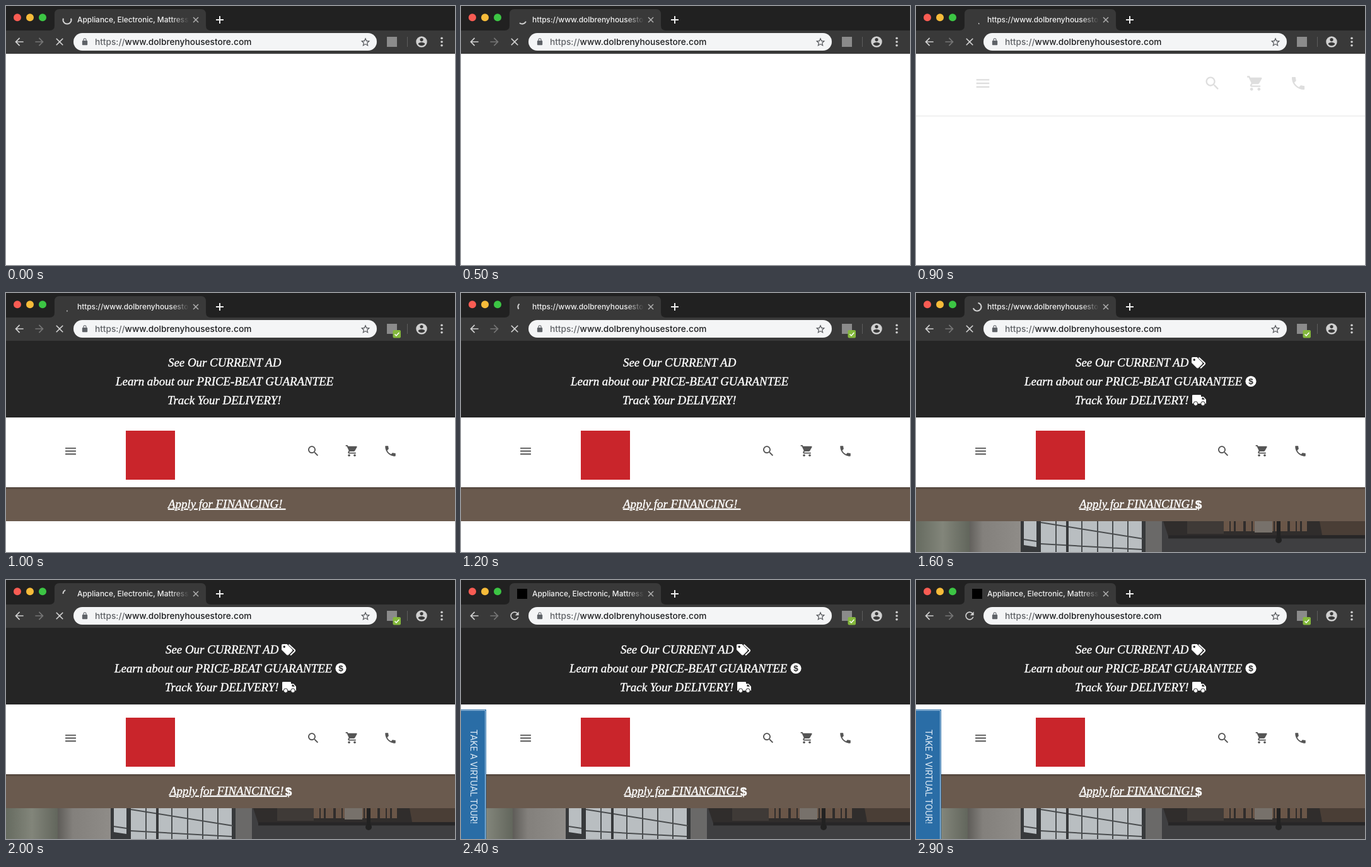
Write an HTML page that moves like this. It is 712 by 412 pixels and loops after 3 s.

```html
<!DOCTYPE html>
<html lang="en">
<head>
<meta charset="utf-8">
<title>Page load</title>
<style>
html, body { margin: 0; width: 100%; height: 100%; overflow: hidden; background: #fff; }
svg { display: block; }
text { white-space: pre; }
.ui { font-family: Inter, sans-serif; font-weight: 500; }
.serif { font: italic 18.9px "Liberation Serif", serif; fill: #fff; stroke: #fff; stroke-width: .4; }
.bold { font-family: "Liberation Sans", sans-serif; font-weight: bold; }
</style>
</head>
<body>
<svg width="712" height="412" viewBox="0 0 712 412">
  <defs>
    <clipPath id="tabClip"><rect x="113" y="10" width="177" height="24"/></clipPath>
    <linearGradient id="fade"><stop stop-color="#393939" stop-opacity="0"/><stop offset="1" stop-color="#393939"/></linearGradient>
    <linearGradient id="plaster"><stop stop-color="#666b60"/><stop offset=".5" stop-color="#82857a"/><stop offset="1" stop-color="#62665c"/></linearGradient>
    <linearGradient id="wall" gradientUnits="userSpaceOnUse" x1="80" x2="166"><stop stop-color="#5b5955"/><stop offset=".3" stop-color="#83807c"/><stop offset="1" stop-color="#8f8c88"/></linearGradient>
    <linearGradient id="shade" x2="0" y2="1"><stop stop-opacity=".3"/><stop offset="1" stop-opacity="0"/></linearGradient>
    <path id="menu" d="M3 18h18v-2H3zM3 13h18v-2H3zM3 6v2h18V6z"/>
    <path id="search" d="M15.5 14h-.79l-.28-.27C15.41 12.59 16 11.11 16 9.5 16 5.91 13.09 3 9.5 3S3 5.91 3 9.5 5.91 16 9.5 16c1.61 0 3.09-.59 4.23-1.57l.27.28v.79l5 4.99L20.49 19zm-6 0C7.01 14 5 11.99 5 9.5S7.01 5 9.5 5 14 7.01 14 9.5 11.99 14 9.5 14z"/>
    <g id="cart"><circle cx="7" cy="20" r="2"/><circle cx="17" cy="20" r="2"/>
      <path d="M1 2v2h2l3.6 7.6-1.35 2.4C4.5 15.4 5.5 17 7 17h12v-2H7.4q-.3-.1-.2-.4L8.1 13h7.45c.75 0 1.4-.4 1.75-1l3.6-6.5Q21.5 4 20 4H5.2l-.9-2z"/></g>
    <path id="phone" d="M6.62 10.79c1.44 2.83 3.76 5.14 6.59 6.59l2.2-2.2c.27-.27.67-.36 1.02-.24 1.12.37 2.33.57 3.57.57.55 0 1 .45 1 1V20c0 .55-.45 1-1 1C10.61 21 3 13.39 3 4c0-.55.45-1 1-1h3.5c.55 0 1 .45 1 1 0 1.25.2 2.45.57 3.57.11.35.03.74-.25 1.02z"/>
    <path id="arrow" d="M20 11H7.83l5.59-5.59L12 4l-8 8 8 8 1.41-1.41L7.83 13H20z"/>
    <path id="close" d="M19 6.41L17.59 5 12 10.59 6.41 5 5 6.41 10.59 12 5 17.59 6.41 19 12 13.41 17.59 19 19 17.59 13.41 12z"/>
    <path id="reload" d="M17.65 6.35C16.2 4.9 14.21 4 12 4c-4.42 0-8 3.58-8 8s3.58 8 8 8c3.73 0 6.84-2.55 7.73-6h-2.08c-.82 2.33-3.04 4-5.65 4-3.31 0-6-2.69-6-6s2.69-6 6-6c1.66 0 3.14.69 4.22 1.78L13 11h7V4z"/>
    <path id="lock" fill-rule="evenodd" d="M18 8h-1V6A5 5 0 0 0 7 6v2H6q-2 0-2 2v10q0 2 2 2h12q2 0 2-2V10q0-2-2-2zM9 6a3 3 0 0 1 6 0v2H9z"/>
    <path id="star" d="M22 9.24l-7.19-.62L12 2 9.19 8.63 2 9.24l5.46 4.73L5.82 21 12 17.27 18.18 21l-1.63-7.03zM12 15.4l-3.76 2.27 1-4.28-3.32-2.88 4.38-.38L12 6.1l1.71 4.04 4.38.38-3.32 2.88 1 4.28z"/>
    <path id="person" fill-rule="evenodd" d="M12 2a10 10 0 1 0 0 20 10 10 0 0 0 0-20zm0 3a3 3 0 1 1 0 6 3 3 0 0 1 0-6zm0 14.2c-2.5 0-4.71-1.28-6-3.22.03-1.99 4-3.08 6-3.08s5.97 1.09 6 3.08c-1.29 1.94-3.5 3.22-6 3.22z"/>
  </defs>

  <!-- Bare page header -->
  <g data-show="800-1000" fill="#dedede">
    <path d="M0 175h712" stroke="#ececec" stroke-width="1.5"/>
    <g id="bareIcons"></g>
  </g>

  <!-- Hero photo -->
  <g data-show="1300-3000">
    <rect y="363" width="712" height="49" fill="#3f3f41"/>
    <rect y="363" width="170" height="49" fill="url(#wall)"/>
    <rect id="panel" y="363" height="49" fill="url(#plaster)"/>
    <path d="M166 363h198v49H166z" fill="#37393b"/>
    <path d="M171 363h20v41l-20-3zM198 363h160v49H198z" fill="#b9bec1"/>
    <path d="M222 363v49M263 363v49M288 363v49M312 363v49M336 363v49M198 365L360 391M171 392l20 3M198 399l160 9" stroke="#4a4d4f" stroke-width="2" fill="none"/>
    <path d="M240 363v49" stroke="#37393b" stroke-width="4"/>
    <path d="M364 363h26v49h-26z" fill="#6a6968"/>
    <path d="M392 363h320v24H400z" fill="#302d2c"/>
    <path d="M430 363h58v20h-58z" fill="#3f3a37"/>
    <path d="M488 371h132" stroke="#6a5648" stroke-width="16" stroke-dasharray="9 2 5 3 12 4"/>
    <path d="M537 363h28v18h-28z" fill="#77716b"/>
    <path d="M640 363h72v22h-68z" fill="#4a3e36"/>
    <path d="M400 388h312" stroke="#272627" stroke-width="5"/>
    <path d="M575 363v30" stroke="#222" stroke-width="6"/>
    <circle cx="575" cy="393" r="5" fill="#222"/>
  </g>

  <!-- Loaded page header -->
  <g data-show="1000-3000">
    <rect y="76" width="712" height="122" fill="#252525"/>
    <rect y="198" width="712" height="111" fill="#fff"/>
    <rect y="309" width="712" height="54" fill="#6a5a4e"/>
    <rect y="309" width="712" height="4" fill="url(#shade)"/>
    <rect x="190" y="219" width="78" height="78" fill="#c9252b"/>
    <g id="icons" fill="#555"></g>
    <g id="lines" class="serif"></g>
  </g>
  <g data-show="1300-3000" fill="#fff">
    <g transform="translate(437 102)">
      <path fill-rule="evenodd" d="M0 2Q0 0 2 0H8.5L17 8.5Q18 9.8 17 11L11 17Q9.5 18.2 8 17L0 9zM4.2 2.5a1.7 1.7 0 1 0 .01 0z"/>
      <path d="M11.5 .8L20.7 9.2Q21.6 10.2 20.7 11.2L14 17.6" fill="none" stroke="#fff" stroke-width="2"/>
    </g>
    <circle cx="531" cy="140.5" r="8.6"/>
    <text class="bold" x="531" y="145.3" font-size="13.5" text-anchor="middle" fill="#252525">$</text>
    <g transform="translate(438 162)">
      <rect width="14" height="14" rx="1.3"/>
      <path d="M13.5 3H18L22 7.5V14H13.5z"/>
      <path d="M15.5 4.6h2L20 7.5h-4.5z" fill="#252525"/>
      <g stroke="#252525"><circle cx="5.5" cy="14" r="3.3"/><circle cx="17" cy="14" r="3.3"/></g>
    </g>
    <text class="bold" x="448" y="342.5" font-size="19" text-anchor="middle" stroke="#fff" stroke-width=".5">$</text>
  </g>

  <!-- Side button -->
  <g data-show="2300-3000">
    <rect y="206" width="40" height="206" fill="#2a6da6"/>
    <path d="M0 207.5H38.5V412" fill="none" stroke="#a9c8e2"/>
    <text transform="translate(14.5 238) rotate(90)" font-family="Roboto, sans-serif" font-size="14.3" fill="#dce9f4">TAKE A VIRTUAL TOUR!</text>
  </g>

  <!-- Browser frame -->
  <rect width="712" height="39" fill="#212121"/>
  <path d="M69 39q8 0 8-8V13q0-8 8-8H309q8 0 8 8V31q0 8 8 8H712V76H0V39z" fill="#393939"/>
  <circle cx="18" cy="18.3" r="6" fill="#f95c53"/>
  <circle cx="38" cy="18.3" r="6" fill="#f6bb3a"/>
  <circle cx="58" cy="18.3" r="6" fill="#3cc544"/>
  <path id="spinner" fill="none" stroke="#d2d2d2" stroke-width="2"/>
  <rect data-show="2300-3000" x="89" y="14" width="16" height="16" fill="#000"/>
  <g clip-path="url(#tabClip)">
    <text id="tabTitle" class="ui" x="113" y="26.3" font-size="11.9" fill="#f1f1f1"></text>
    <rect x="262" y="12" width="28" height="20" fill="url(#fade)"/>
  </g>
  <path d="M297 18l8 8M305 18l-8 8" stroke="#b0b0b0" stroke-width="1.5"/>
  <path d="M333 22h12M339 16v12" stroke="#eee" stroke-width="2"/>
  <rect x="107" y="43" width="481" height="28" rx="14" fill="#f4f5f6"/>
  <text class="ui" x="141" y="62" font-size="13.7" fill="#5f6266">https://<tspan id="address" fill="#1c1d1f"></tspan></text>
  <rect x="604" y="49" width="16" height="16" fill="#8b8b8b"/>
  <g data-show="1000-3000">
    <rect x="613.5" y="59" width="12.5" height="12.5" rx="2" fill="#84b83c"/>
    <path d="M616.5 65.5l2.4 2.5 4.4-5" fill="none" stroke="#fff" stroke-width="1.5"/>
  </g>
  <path d="M636.5 49v16" stroke="#5c5c5c"/>
  <g id="bar" fill="#d0d0d0"><circle cx="691" cy="51.3" r="1.8"/><circle cx="691" cy="57" r="1.8"/><circle cx="691" cy="62.7" r="1.8"/></g>
</svg>
<script>
const $ = id => document.getElementById(id);
const LOOP = 3000, STEP = 100;
const site = "www.dolbrenyhousestore.com";

function add(parent, tag, attrs) {
  const el = document.createElementNS("http://www.w3.org/2000/svg", tag);
  for (const key in attrs) el.setAttribute(key, attrs[key]);
  return $(parent).appendChild(el);
}

// Place a 24-unit icon with its middle at x, y.
function icon(parent, name, x, y, size, { flip, ...attrs } = {}) {
  const k = size / 24;
  add(parent, "use", {
    href: "#" + name, ...attrs,
    transform: `translate(${x} ${y}) scale(${flip ? -k : k} ${k}) translate(-12 -12)`
  });
}

icon("bareIcons", "menu", 106, 123, 27.5);
icon("bareIcons", "search", 470, 123, 28);
icon("bareIcons", "cart", 538, 123, 28);
icon("bareIcons", "phone", 606, 123, 27);
icon("icons", "menu", 102.5, 251.5, 22.5);
icon("icons", "search", 487.3, 251.5, 22);
icon("icons", "cart", 548.5, 251, 21.5);
icon("icons", "phone", 609.5, 251.5, 22);

icon("bar", "arrow", 21, 57, 20);
icon("bar", "arrow", 53, 57, 20, { flip: true, fill: "#757575" });
icon("bar", "close", 85, 57, 20, { "data-show": "0-2300" });
icon("bar", "reload", 85, 57, 20, { "data-show": "2300-3000" });
icon("bar", "lock", 125, 57, 12.5, { fill: "#5f6368" });
icon("bar", "star", 570, 57.5, 17.5, { fill: "#505357" });
icon("bar", "person", 659, 57, 21);
$("address").textContent = site;

// Text, baseline, x before and after the trailing icons load.
const lines = [
  ["See Our CURRENT AD", 117, 257, 253],
  ["Learn about our PRICE-BEAT GUARANTEE", 147, 174, 172],
  ["Track Your DELIVERY!", 177, 256, 252],
  ["Apply for FINANCING! ", 342, 257, 259]
].map(([text, y, early, late], i) => {
  const el = add("lines", "text", i == 3 ? { y, "text-decoration": "underline" } : { y });
  el.textContent = text;
  return { el, early, late };
});

// Time, start angle, end angle.
const arcs = [[0, -20, 200], [900, 60, 72], [1000, 85, 97], [1300, 180, 290], [1650, 300, 560], [2000, 540, 605], [2300, 620, 800]];

function spinnerPath(t) {
  const i = Math.max(1, arcs.findIndex(a => a[0] >= t));
  const [a, b] = [arcs[i - 1], arcs[i]];
  const p = (t - a[0]) / (b[0] - a[0]);
  const [start, end] = [1, 2].map(k => a[k] + (b[k] - a[k]) * p);
  const point = deg => {
    const r = deg * Math.PI / 180;
    return `${97 + 6.5 * Math.cos(r)} ${22 + 6.5 * Math.sin(r)}`;
  };
  return `M${point(start)}A6.5 6.5 0 ${end - start > 180 ? 1 : 0} 1 ${point(end)}`;
}

const timed = [...document.querySelectorAll("[data-show]")].map(el => {
  const [from, to] = el.dataset.show.split("-").map(Number);
  return { el, from, to };
});

function draw(now) {
  const t = Math.floor(now % LOOP / STEP) * STEP;
  for (const { el, from, to } of timed) el.style.display = t >= from && t < to ? "" : "none";
  for (const { el, early, late } of lines) el.setAttribute("x", t < 1300 ? early : late);
  $("tabTitle").textContent = t >= 400 && t < 1900 ? "https://" + site : "Appliance, Electronic, Mattress";
  $("spinner").setAttribute("d", t < 2300 ? spinnerPath(t) : "");
  $("panel").setAttribute("width", 87 - 5 * Math.min(1, Math.max(0, (t - 1300) / 700)));
}

const began = performance.now();
(function tick() {
  draw(performance.now() - began);
  requestAnimationFrame(tick);
})();
</script>
</body>
</html>
```
